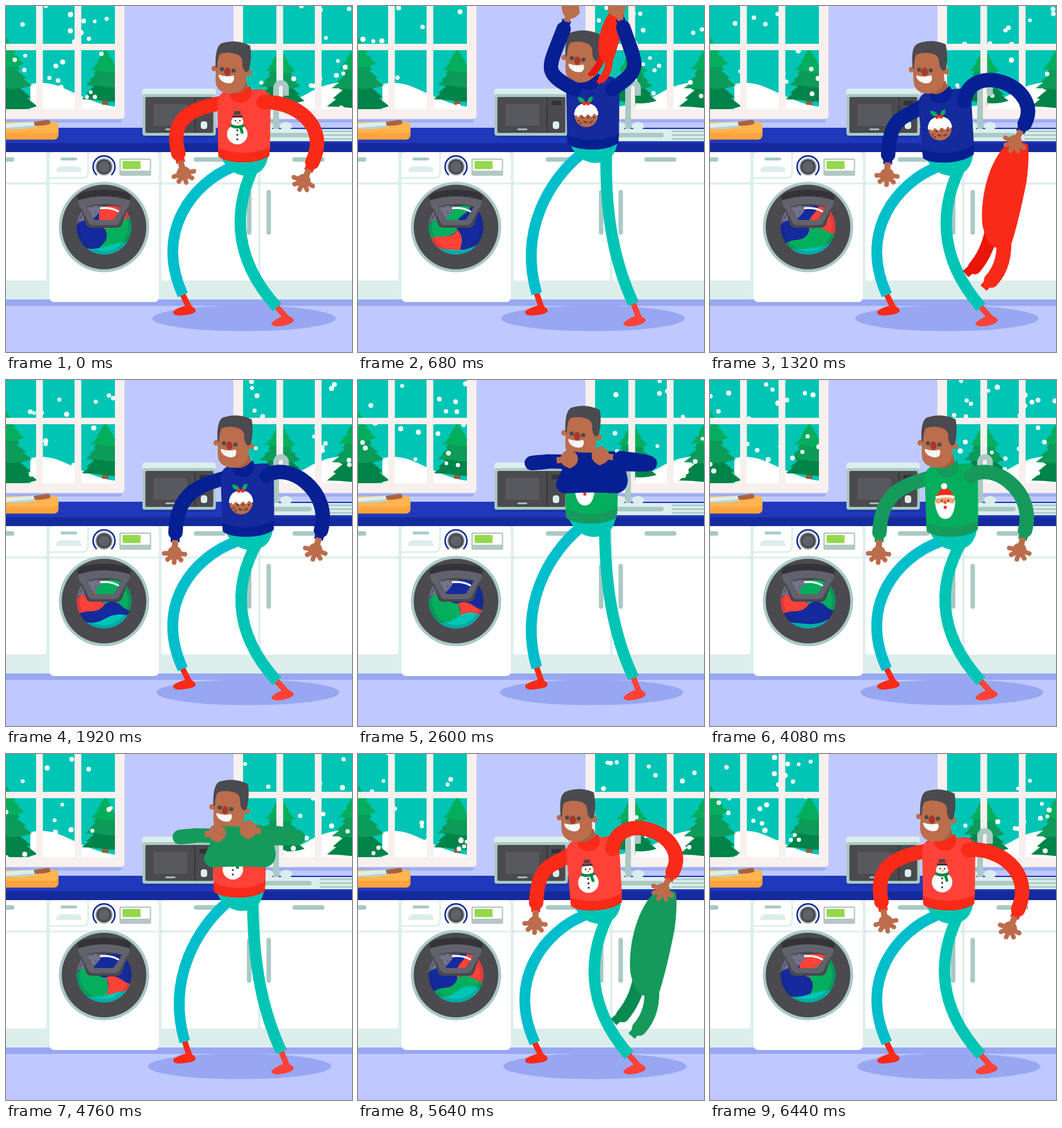
An HTML page with a canvas for the animation above (6.48 s loop, 540 px wide and 540 px high).

```html
<!DOCTYPE html>
<html lang="en">
<head>
<meta charset="utf-8">
<title>Kitchen sweater dance</title>
<style>
html, body { margin: 0; width: 100%; height: 100%; overflow: hidden; background: #bfc9ff; }
canvas { display: block; width: 540px; height: 540px; }
</style>
</head>
<body>
<canvas id="stage" width="540" height="540"></canvas>
<script>
const ctx = document.getElementById('stage').getContext('2d');
const LOOP = 6480, TURN = 2160, TAU = Math.PI * 2, DEG = Math.PI / 180;
const PALE = '#dceeec', SAGE = '#a9c9c4', DARK = '#4a4a4f', GLASS = '#00c5b5', SKIN = '#bb6d4c', FRAME = '#f7f0ee';
const SWEATERS = [
  { body: '#ff4238', dark: '#f92a18', back: '#ec150a', motif: snowman },
  { body: '#152a9c', dark: '#061f92', back: '#051a70', motif: pudding },
  { body: '#05ae5c', dark: '#159a5c', back: '#0a8a50', motif: santa }
];

// drawing helpers
function fill(d, color) { ctx.fillStyle = color; ctx.fill(new Path2D(d)); }
function line(d, color, width, cap = 'round') {
  ctx.strokeStyle = color; ctx.lineWidth = width; ctx.lineCap = cap; ctx.lineJoin = 'round';
  ctx.stroke(new Path2D(d));
}
function box(x, y, w, h, color, r = 0) {
  ctx.fillStyle = color; ctx.beginPath(); ctx.roundRect(x, y, w, h, r); ctx.fill();
}
function oval(x, y, rx, color, ry = rx) {
  ctx.fillStyle = color; ctx.beginPath(); ctx.ellipse(x, y, rx, ry, 0, 0, TAU); ctx.fill();
}
function group(x, y, deg, draw, scale = 1) {
  ctx.save(); ctx.translate(x, y); ctx.rotate(deg * DEG); ctx.scale(scale, scale); draw(); ctx.restore();
}
function clipped(d, draw) { ctx.save(); ctx.clip(new Path2D(d)); draw(); ctx.restore(); }
function ramp(t, a, b) { const u = Math.min(1, Math.max(0, (t - a) / (b - a))); return u * u * (3 - 2 * u); }
// the point `len` away from (x, y) in a hand's pointing direction
function reach(x, y, deg, len) { return [x - len * Math.sin(deg * DEG), y + len * Math.cos(deg * DEG)]; }

// Key poses. body: hip x, y, tilt, head dx, dy. arm: elbow handle, wrist, hand angle.
const mirror = (axis, [hx, hy, wx, wy, a]) => [2 * axis - hx, hy, 2 * axis - wx, wy, -a];
const GRAB = [300, 175, 318, 222, -75], UP = [285, 100, 322, 30, -165];
const POSES = [
  { at: 0, body: [371, 235, 0, 0, 0], left: [302, 158, 269, 230, -15], right: [450, 148, 478, 244, 25] },
  { at: 220, body: [366, 236, 0, 1, 3], left: GRAB, right: mirror(366, GRAB) },
  { at: 440, body: [364, 215, 0, 3.5, 5], left: [302, 122, 298, 127, -97], right: [471, 134, 410, 122, 97] },
  { at: 640, body: [366, 214, 0, 2, 3], left: UP, right: mirror(366, UP) },
  { at: 1320, body: [372, 235, -4, -2, -2], left: [303, 178, 278, 232, 3], right: [408, 83, 491, 184, 28] }
];

// smooth cyclic curve through the key poses
function poseAt(p) {
  const n = POSES.length;
  let i = n - 1;
  while (POSES[i].at > p) i--;
  const key = k => POSES[(k + n) % n];
  const time = k => key(k).at + Math.floor(k / n) * TURN;
  const span = time(i + 1) - time(i), u = (p - time(i)) / span, e = u * u * (3 - 2 * u);
  const part = name => key(i)[name].map((a, j) => {
    const v = k => key(k)[name][j];
    const slope = k => (v(k + 1) - v(k - 1)) / (time(k + 1) - time(k - 1)) * span;
    return a + (v(i + 1) - a) * e + u * (1 - u) * ((1 - u) * slope(i) - u * slope(i + 1));
  });
  const pose = { body: part('body'), left: part('left'), right: part('right') };
  // sway to the right while the sweater is thrown
  pose.body[0] += 7 * Math.sin(Math.PI * Math.max(0, (p - 1400) / (TURN - 1400)));
  return pose;
}

// snow
const FALL = 1296, PANE = 166;
let seed = 71;
function rand() { seed = (seed * 16807) % 2147483647; return seed / 2147483647; }
const flakes = Array.from({ length: 300 }, (_, i) => ({
  x: (i % 2) * 370 + rand() * 170, y: rand() * FALL, r: 2.8 + rand() * 1.3
}));
function snow(t) {
  for (const f of flakes) {
    const y = (f.y + t * FALL / LOOP) % FALL - 5;
    if (y < PANE) oval(f.x, y, f.r, '#fff');
  }
}

// one tier of a fir: a cone with two notches and a sagging hem
function tier(top, bottom, w, color) {
  const h = bottom - top, side = s => [[0.58, 0.66], [0.48, 0.68], [0.8, 0.84], [0.7, 0.86], [1, 1]]
    .map(([x, y]) => `${s * x * w} ${top + y * h}`);
  const right = side(1), left = side(-1).reverse();
  fill(`M0 ${top}L${right.join('L')}Q${w / 2} ${bottom + 6} 0 ${bottom + 3}T${left.join('L')}Z`, color);
}
function tree(x, y, s) {
  group(x, y, 0, () => {
    box(-5, 80, 10, 11, '#9c5b3c');
    tier(18, 82, 38, '#008348');
    tier(8, 59, 32, '#0c9b58');
    tier(0, 35, 24, '#05ae5c');
  }, s);
}

function windows(t) {
  box(0, 170, 181, 12, '#a0aef4', 4);
  box(360, 170, 190, 12, '#a0aef4', 4);
  box(-10, -10, 195, 186.5, FRAME, 6);
  box(355, -10, 200, 186.5, FRAME, 6);
  box(0, 0, 170, 161, GLASS);
  box(370, 0, 170, 161, GLASS);
  clipped('M0 0H170V161H0Z M370 0H540V161H370Z', () => {
    fill('M38 122Q60 117 82 125C108 135 140 154 170 157V161H38Z', '#fff');
    fill('M370 160Q432 158 470 137Q500 118 540 118V161H370Z', '#fff');
    tree(155, 66, 0.97);
    tree(428, 66, 1);
    tree(-5, 40, 1.42);
    tree(548, 55, 1.24);
    snow(t);
  });
  for (const x of [47, 107, 422, 482]) box(x, 0, 10.5, 161, FRAME);
  box(0, 59, 172, 10, FRAME);
  box(368, 59, 172, 10, FRAME);
}

function counter() {
  box(0, 190, 540, 24, '#2038bc');
  box(0, 214, 540, 14, '#152a9c');
  // board and knife
  box(-10, 184, 92, 24.5, '#ffa33c', 7);
  box(-10, 181, 92, 17, '#ffb44f', 7);
  fill('M0 186L46 180 48 188Q25 194 0 191Z', '#b9d3cf');
  fill('M0 183L44 181 46 186 0 190Z', PALE);
  fill('M43 181L66 177.5Q70 179 69 184Q62 187 45 187Z', '#a9643f');
  // microwave
  box(216, 198, 110, 7, '#152a9c', 3);
  box(213, 129, 114.5, 20, PALE, 4);
  box(213, 137.5, 114.5, 65, SAGE, 4);
  box(217.5, 142, 106, 56, DARK, 2);
  box(230, 153, 53, 34, '#58585f', 2);
  box(294, 142, 2, 56, '#38383d');
  box(302, 148, 15, 7, '#333338', 1);
  box(304, 180, 10, 12, PALE, 4);
  line('M250 192.5H263', SAGE, 2.5);
  // sink
  box(396, 192, 150, 19, PALE, 3);
  box(400, 198, 77, 7, SAGE, 3.5);
  for (const y of [195.5, 201.5, 207.5]) line(`M491 ${y}H545`, SAGE, 2.5);
  line('M421.5 192V127A7.8 7.8 0 0 1 437 127V140', SAGE, 9, 'butt');
  for (const x of [408, 437]) oval(x, 187.5, 9.5, PALE, 6.5);
}

function cabinets() {
  box(0, 228, 540, 231, PALE);
  for (const [x, w] of [[-10, 73], [242.5, 151], [397, 160]]) {
    box(x, 228, w, 47.5, '#fff', 4);
    box(x, 278.5, w, 150, '#fff', 4);
  }
  for (const x of [-37, 293, 447]) box(x, 236, 50, 7, SAGE, 3.5);
  for (const x of [376, 406.5]) box(x, 287, 7, 70, SAGE, 3.5);
  box(0, 458, 540, 10, '#98a7f1');
}

function wedge(from, to, color) {
  const p = (r, deg) => reach(0, 0, deg - 90, r).join(' ');
  fill(`M0 0Q${p(15, from - 30)} ${p(26, from)}T${p(70, from + 4)}L${p(99, (from + to) / 2)}L${p(70, to + 4)}
    Q${p(42, to + 14)} ${p(26, to)}T0 0Z`, color);
}

function drum(t) {
  const p = t % TURN / TURN;
  box(105, 300, 96, 90, '#73738a');
  for (let y = 306; y < 388; y += 8) {
    for (let x = 112 + (y % 16) / 2; x < 196; x += 9) oval(x, y, 1.3, '#55556a');
  }
  // clothes tumble twice per sweater, heaped towards the right
  clipped('M105 346Q120 330 134 334Q146 324 150 314L200 304V400H105Z', () => {
    box(105, 300, 96, 95, '#152a9c');
    group(155, 349, p * 720 - 45 * Math.sin(Math.PI * p), () => {
      wedge(-112, -30, '#ff4238');
      wedge(-34, 104, '#05ae5c');
    });
    const tip = Math.sin(t / LOOP * TAU * 2) * 5;
    fill(`M105 ${371 + tip}Q130 ${384 - tip} 153 ${376 + tip}T201 ${368 - tip}V395H105Z`, GLASS);
  });
  ctx.strokeStyle = 'rgba(40,40,70,.17)'; ctx.lineWidth = 7;
  ctx.beginPath(); ctx.arc(153, 345, 41, 0, TAU); ctx.stroke();
}

function washer(t) {
  box(68, 228, 170.5, 234, '#fff', 7);
  line('M68 277H238', PALE, 2.5, 'butt');
  line('M68 268.5H120Q128 268 128 260V228', PALE, 2.5, 'butt');
  box(85, 236.5, 26, 4.5, SAGE, 2.2);
  fill('M78 259Q78 250 88 250H108Q118 250 118 259Z', PALE);
  ctx.strokeStyle = '#152a9c'; ctx.lineWidth = 2.5; ctx.lineCap = 'round';
  ctx.beginPath(); ctx.arc(153, 251, 17, 135 * DEG, 45 * DEG); ctx.stroke();
  oval(153, 251, 14, '#b3c6c8');
  oval(153, 251, 12, DARK);
  oval(153, 251, 8.5, '#606067');
  box(177, 238, 49.5, 27, '#b3c8c5', 2);
  box(179, 240, 45.5, 17, '#fff', 1);
  box(182, 242, 28, 12.5, '#94d84c', 1);
  oval(153, 345, 70.5, SAGE);
  oval(153, 345, 66, DARK);
  clipped('M110 345a43 43 0 0 1 86 0a43 43 0 0 1 -86 0Z', () => drum(t));
  // door handle
  fill('M113 304Q108 294 122 290Q153 283 185 290Q198 294 193 304L187 312H119Z', '#333338');
  fill('M115 312Q153 303 191 312L181 341Q179 346 173 346H133Q127 346 125 341Z M126 314L138 334H168L181 314Q153 308 126 314Z', '#48484f');
  fill('M113 303Q153 291 193 303Q194 312 188 317L177 338Q175 342 170 342H136Q131 342 129 338L118 317Q112 312 113 303Z M126 313L136 331Q137 334 141 334H165Q169 334 170 331L181 313Q153 305 126 313Z', '#62626c');
  line('M148 315.5Q164 314 175 320.5', '#fff', 3);
}

// sweater pictures, centred on their own middle
function snowman() {
  oval(0, 10, 16, '#fff');
  oval(0, -9, 9.5, '#fff');
  box(-5, -26, 10, 9, DARK, 1);
  box(-8, -19, 16, 3, '#333338', 1);
  box(-4.5, -20.5, 9, 2, '#f92a18');
  for (const x of [-3, 4]) oval(x, -11, 1.2, '#333');
  fill('M-1 -9L4 -8 0 -6Z', '#ff9a2e');
  line('M-9 -3Q0 1 9 -3', '#008a47', 4.5);
  line('M5 -1L8 9', '#008a47', 4.5, 'butt');
  for (const y of [4, 11, 18]) oval(0, y, 1.6, '#333');
}
function pudding() {
  oval(0, 1, 18, '#b96b4a');
  for (let i = 0; i < 9; i++) oval(-12 + i * 3, 9 + 5 * Math.sin(i * 2.2), 1.4, '#5a2f2c');
  fill('M-19 -1Q-17 -18 0 -18T19 -1Q16 3 14 -1Q11 -3 10 1Q7 5 5 0Q2 -2 0 1Q-3 6 -6 0Q-9 -2 -11 2Q-14 5 -15 0Q-18 3 -19 -1Z', '#fff');
  fill('M-1 -18Q-14 -19 -13 -28Q-3 -28 -1 -18Z M2 -18Q1 -28 10 -29Q12 -20 2 -18Z', '#05ae5c');
  for (const x of [-3, 3]) oval(x, -18, 3, '#f92a18');
}
function santa() {
  fill('M-16 -3Q-14 26 0 26T16 -3Z', '#fff');
  fill('M-15 -8Q-5 -24 0 -23Q10 -20 14 -8Z', '#f92a18');
  oval(-1, -25, 4.8, '#fff');
  box(-15.5, -8, 31, 10, '#f3a071', 5);
  line('M-13 -8Q0 -11 13 -8', '#fff', 4);
  for (const s of [-1, 1]) {
    oval(s * 5, -2.5, 1.4, '#333');
    oval(s * 5, 3.5, 5.5, '#fff', 3);
  }
  oval(0, 0, 2.6, '#e85a3c');
  oval(0, 8, 2.5, '#f92a18');
}

function torso(s) {
  fill('M-41 -82Q-41 -98 -28 -102L28 -105Q42 -102 42 -88L41 -14Q38 9 0 9T-40 -14Z', s.body);
  fill('M-40.5 -14Q0 3 41 -15L40 -1Q26 9 0 9Q-28 9 -39.5 0Z', s.dark);
  group(-10, -45, 0, s.motif);
}
function collar(s) {
  fill('M-21 -116L4 -118 8 -101Q-3 -92 -17 -98Z', '#a95c40');
  fill('M-23 -101Q-7 -93 9 -110Q13 -107 12 -98Q8 -84 -6 -84Q-22 -85 -23 -101Z', s.dark);
}
function head() {
  ctx.save();
  ctx.translate(-371, -235);
  oval(325, 97.5, 4.3, SKIN);
  oval(379, 104, 4.8, SKIN);
  fill('M328 80L340 64H368L376 82L375 117Q371 136 350 137Q327 135 327 116Z', SKIN);
  fill('M327 96Q326 62 337 58Q360 51 381 62Q384 78 380 97Q379 103 374 103Q368 98 369 86Q368 79 362 76Q347 70 334 75Q330 82 329.5 96Z', DARK);
  oval(337, 98.5, 3.2, DARK);
  oval(355, 101, 3.2, DARK);
  oval(345.5, 102.5, 5, '#a4392d', 6.5);
  fill('M332 107Q344 112 355 108.5Q358 116 352 120Q344 122 337 117Q331 112 332 107Z', '#fff');
  line('M339 110V117M344 111V120M350 111V120', '#d9dbe0', 0.8);
  ctx.restore();
}

function hand(curl) {
  line('M0 -2V16', SKIN, 9.5, 'butt');
  oval(0, 18, 11 + 2.5 * curl, SKIN);
  for (let i = -2; i <= 2; i++) {
    const [x, y] = reach(0, 14, i * 36, (19 - Math.abs(i)) * (1 - curl * 0.3));
    line(`M0 18L${x} ${y}`, SKIN, 7.2);
  }
}
function arm([sx, sy], [hx, hy, wx, wy, angle], s, curl) {
  line(`M${sx} ${sy}C${hx} ${hy} ${reach(wx, wy, angle, -65).join(' ')} ${wx} ${wy}`, s.dark, 22.5);
  group(wx, wy, angle, () => {
    line('M0 4V15', s.dark, 14, 'butt');
    group(0, 14, 0, () => hand(curl));
  });
}

function loose(s) {
  line('M-38 138Q-44 170 -64 194', s.back, 21);
  line('M-62 190L-78 204', s.back, 13, 'butt');
  fill('M-13 1C-38 22 -56 78 -52 126Q-46 158 -31 163L-8 161Q4 126 17 60Q22 22 19 2Q6 -6 -13 1Z', s.dark);
  line('M-19 142Q-14 188 -38 214', s.dark, 23);
  line('M-36 210L-50 226', s.dark, 13, 'butt');
}

// the old sweater being turned up over the head
function pulled(s, p) {
  const up = ramp(p, 440, 660), lift = ramp(p, 220, 440);
  const fold = 9 - 47 * lift - 82 * up, top = -104 - 82 * up;
  const w = 41 + 14 * lift - 12 * up;
  if (lift < 1) clipped(`M-60 -130H60V${fold}H-60Z`, () => torso(s));
  const flap = Math.max(top, fold - (9 - fold) * 1.5);
  fill(`M${-w + 22} ${flap}Q-4 ${flap + 5} ${w - 20} ${flap}Q${w - 4} ${flap + 8} ${w + 2} ${fold - 22}
    Q${w + 2} ${fold - 4} ${w - 14} ${fold}Q0 ${fold - 3} ${-w + 14} ${fold}Q${-w} ${fold - 2} ${-w} ${fold - 16}Z`, s.dark);
}

// the old sweater hanging from the right hand, then thrown
const RELEASE = 1470;
function held(s, p) {
  const [, , wx, wy, angle] = poseAt(Math.min(p, RELEASE)).right;
  const [x, y] = reach(wx, wy, angle, 32);
  const fly = Math.max(0, p - RELEASE);
  const turn = 38 * ramp(p, 640, 900) - 38 * ramp(p, 1040, 1320) - 25 * ramp(p, 1330, 1480) - fly * 0.16;
  group(x + 1 + fly * 0.62, y + 2 - fly * 0.35 + fly * fly * 0.0006, turn, () => loose(s), 0.5 + 0.5 * ramp(p, 640, 1060));
}

function legs(x, y, tilt) {
  const k = (235 - y) / 20, lean = -tilt * 0.8;
  const l = [276 + 3 * k, 451 - 2 * k], r = [423 + 7 * k, 470 - 5 * k];
  line(`M${l}L287 473`, '#f92a18', 9);
  fill('M283 467Q296 469 296 476Q294 482 270 483Q260 483 261 477Q264 472 283 467Z', '#f92a18');
  line(`M${r}L439 488`, '#ff4238', 9);
  fill('M437 482Q449 486 449 491Q446 498 424 500Q414 500 414.5 495Q417 490 437 482Z', '#ff4238');
  line(`M${x - 19} ${y + 17}C${295 + 5 * k} ${275 - 5 * k} ${230 + 20 * k} 350 ${l}`, '#00becb', 17, 'butt');
  fill(`M${x - 38} ${y - 6}H${x + 39}Q${x + 36} ${y + 29} ${x + 4} ${y + 30}Q${x - 26} ${y + 29} ${x - 38} ${y - 6}Z`, GLASS);
  line(`M${x + 21 + lean} ${y + 5}C${355 + 30 * k + lean} 310 ${350 + 45 * k + lean} 390 ${r}`, GLASS, 18, 'butt');
}

function man(t) {
  const p = t % TURN, i = Math.floor(t / TURN);
  const old = SWEATERS[i], fresh = SWEATERS[(i + 1) % 3];
  const { body: [x, y, tilt, hx, hy], left, right } = poseAt(p);
  const worn = p < 220 ? old : fresh, sleeve = p < 650 ? old : fresh;
  const curl = ramp(p, 160, 260) - ramp(p, 720, 900);
  const front = p > 140 && p < 760;
  const shoulder = dx => {
    const c = Math.cos(tilt * DEG), s = Math.sin(tilt * DEG);
    return [x + dx * c + 85 * s, y + dx * s - 85 * c];
  };
  const leftArm = () => arm(shoulder(-28), left, sleeve, curl);

  oval(x + 0.5 + tilt * 0.7, 487.5, 143, '#98a7f1', 20);
  legs(x, y, tilt);
  if (!front) leftArm();
  group(x, y, tilt, () => {
    torso(worn);
    collar(worn);
    group(hx, hy, 0, head);
    if (p >= 220 && p < 650) pulled(old, p);
  });
  if (p >= 650 && p < 2000) held(old, p);
  if (front) leftArm();
  arm(shoulder(31), right, sleeve, curl);
}

const start = performance.now();
function frame(now) {
  const t = Math.floor(Math.max(0, now - start) % LOOP / 40) * 40;
  box(0, 0, 540, 540, '#bfc9ff');
  windows(t);
  counter();
  cabinets();
  washer(t);
  man(t);
  requestAnimationFrame(frame);
}
frame(start);
</script>
</body>
</html>
```
